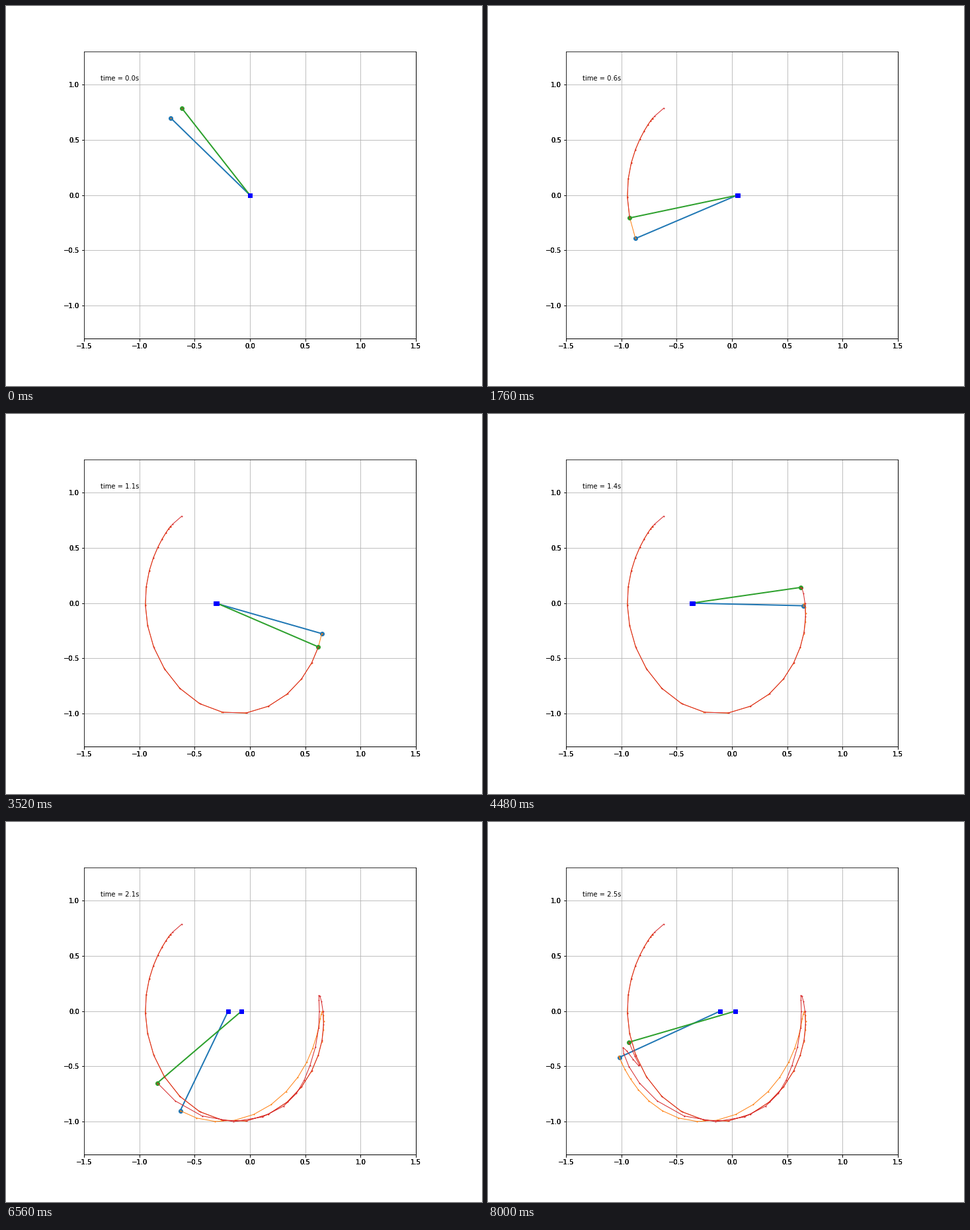
Write a matplotlib script that moves like this. It is 720 px wide and 576 px high and loops after 8160 ms.

```python
import numpy as np
import matplotlib.pyplot as plt
from matplotlib.animation import FuncAnimation

FRAMES = 51
DT = 0.05
ROD = 167.4  # rod length in pixels, one data unit
LAG = 0.95   # steps the estimate trails while it still tracks well
DRIFT = 22   # step after which the estimate goes its own way

plt.rcParams["text.kerning_factor"] = 6


def spline(keys, t):
    """Natural cubic spline through rows of (step, angle, cart)."""
    keys = np.array(keys, float)
    knots, values = keys[:, 0], keys[:, 1:]
    n = len(knots)
    line = np.column_stack([np.ones(n), knots])
    cubes = np.abs(knots[:, None] - knots) ** 3
    system = np.block([[cubes, line], [line.T, np.zeros((2, 2))]])
    weights = np.linalg.solve(system, np.vstack([values, np.zeros((2, 2))]))
    basis = np.column_stack([np.abs(t[:, None] - knots) ** 3, np.ones(len(t)), t])
    return (basis @ weights).T


# Key poses: step, angle from hanging (degrees, left positive), cart offset (pixels)
TRUE_KEYS = [
    (0, 134.3, 0), (2, 132.2, 0.8), (5, 120.6, 5), (9, 89.3, 9.2), (13, 40, 0.7),
    (17, -20.6, -32), (22, -74, -52.2), (27, -89.8, -58.3), (31, -77, -62.3),
    (35, -43.2, -60), (39, 3, -44), (43, 44.7, -24), (47, 64.9, -18.5), (50, 65.3, -18)]
DRIFT_KEYS = [
    (20, -47.1, -43.3), (23, -74.8, -52.5), (27, -97.9, -60), (30, -90, -62.4),
    (33, -60.7, -55), (36, -30.7, -34.5), (38, 0, -24.5), (40, 35.7, -15.5),
    (42, 59.9, -11), (44, 70.8, -6.5), (47.5, 59.9, 5.5), (50, 73.7, 5)]


def positions(angle, cart):
    a = np.radians(angle)
    x = cart / ROD
    return x, x - np.sin(a), -np.cos(a)


steps = np.arange(FRAMES)
true_state = spline(TRUE_KEYS, steps)
trailing = spline(TRUE_KEYS, np.maximum(steps - LAG, 0))
trailing[0] += 7.7 * 0.2 ** steps  # wrong first guess, quickly corrected
est_state = np.where(steps <= DRIFT, trailing, spline(DRIFT_KEYS, steps))

fig = plt.figure(figsize=(10, 8), dpi=72, facecolor="white")


def make_axes(label):
    ax = fig.add_axes([117.9 / 720, 71.64 / 576, 502.2 / 720, 435.24 / 576], label=label)
    ax.set(xlim=(-1.5, 1.5), ylim=(-1.3, 1.3),
           xticks=np.arange(-1.5, 1.6, 0.5), yticks=np.arange(-1, 1.1, 0.5))
    ax.grid(True)
    return ax


# Stacked axes give the heavy tick labels
for layer in ("lower", "middle"):
    make_axes(layer)
ax = make_axes("upper")

systems = []
for state, rod_color, trace_color in ((true_state, "C0", "C1"), (est_state, "C2", "C3")):
    rod, = ax.plot([], [], "o-", color=rod_color, lw=2)
    trace, = ax.plot([], [], ".-", color=trace_color, lw=1, ms=2)
    systems.append((positions(*state), rod, trace))
carts = [ax.plot([], [], "bs")[0] for _ in systems]
clock = ax.text(0.05, 0.9, "", transform=ax.transAxes)


def draw(k):
    for ((x, bx, by), rod, trace), cart in zip(systems, carts):
        rod.set_data([x[k], bx[k]], [0, by[k]])
        trace.set_data(bx[:k + 1], by[:k + 1])
        cart.set_data([x[k]], [0])
    clock.set_text("time = %.1fs" % (k * DT))
    return [clock, *carts]


anim = FuncAnimation(fig, draw, frames=FRAMES, interval=160, repeat=True, repeat_delay=0)
plt.show()
```
